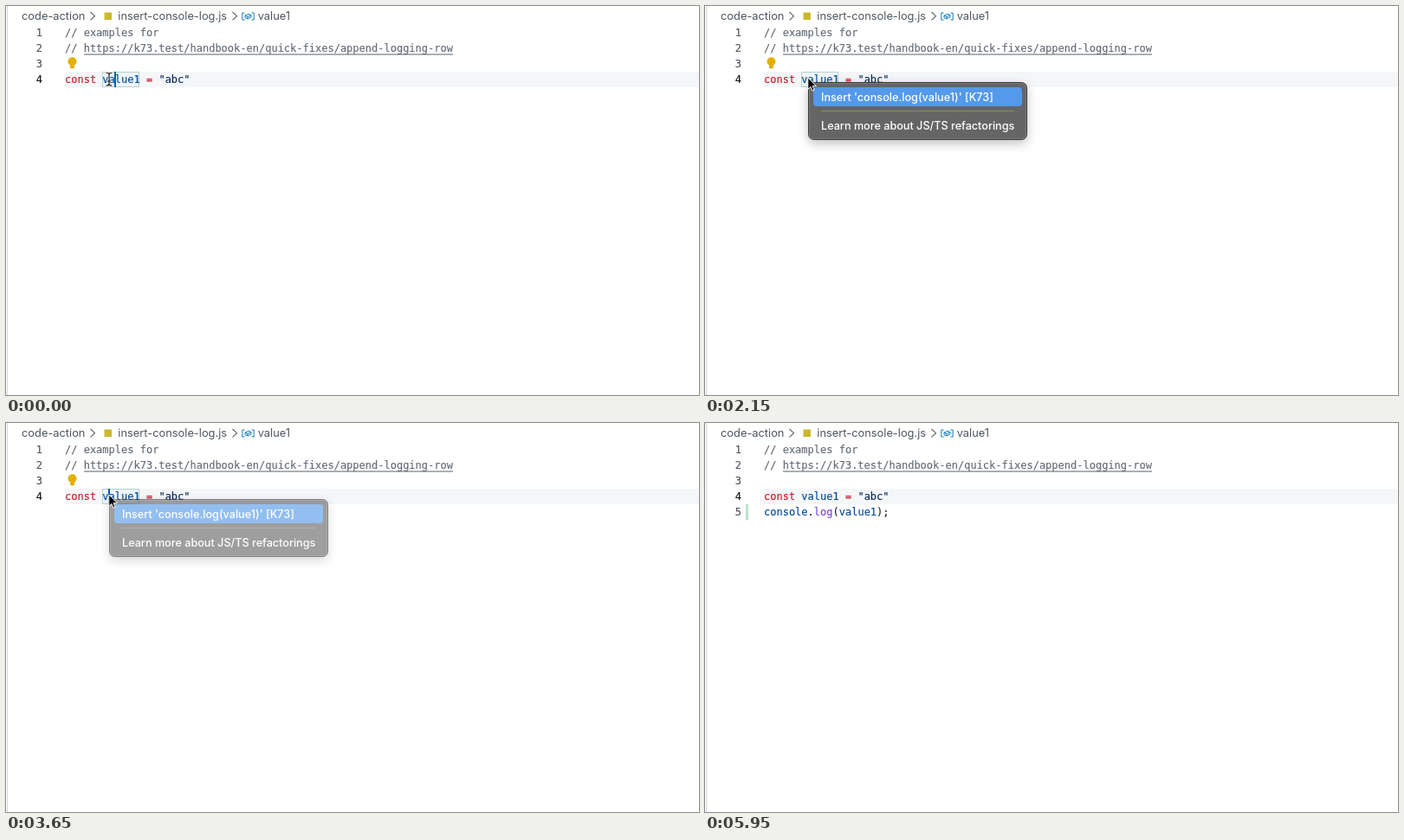
An HTML page for the animation above (6150 ms loop, 800x450 px).

```html
<!DOCTYPE html>
<html lang="en">
<head>
<meta charset="utf-8">
<title>Insert log statement</title>
<style>
  html, body { margin: 0; width: 100%; height: 100%; overflow: hidden; background: #fff; }
  svg { display: block; width: 100vw; height: 100vh; }
  text { white-space: pre; }
  .ui { font: 12.85px Inter, "Open Sans", sans-serif; fill: #4d555e; }
  .menu { font: 500 12.65px Inter, "Open Sans", sans-serif; fill: #fff; }
  .code { font: 12px "DejaVu Sans Mono", monospace; color: #24292f; }
  .code text, .code tspan { fill: currentColor; stroke: currentColor; stroke-width: .15; }
  .num { text-anchor: end; color: #4d555e; }
  .now { color: #111418; }
  .comment { color: #636b74; }
  .key { color: #cb1a2e; }
  .name { color: #044a9c; }
  .str { color: #0a2a5c; }
  .fn { color: #7a45d0; }
  .plain tspan { color: #24292f; }
  .line { fill: none; stroke: #59616a; }
</style>
</head>
<body>
<svg viewBox="0 0 800 450">
  <defs>
    <filter id="shadow" x="-20%" y="-40%" width="140%" height="200%">
      <feDropShadow dx="0" dy="4" stdDeviation="6" flood-color="#000" flood-opacity=".25"/>
    </filter>
  </defs>
  <rect width="800" height="450" fill="#fff"/>
  <rect x="1" width="1" height="450" fill="#d5d8dc"/>

  <g class="ui">
    <text x="18" y="16">code-action</text>
    <path class="line" stroke-width="1.1" d="M97.5 7l5 4.700-5 4.700M261.500 7l5 4.700-5 4.700"/>
    <rect x="113.500" y="7.500" width="8.500" height="8.500" fill="#cbb82f"/>
    <text x="129.300" y="16">insert-console-log.js</text>
    <g fill="none" stroke="#0f7bbd">
      <path d="M275.500 8h-2.700v8h2.700M283.500 8h2.700v8h-2.700"/>
      <path d="M276 11.200l4-2 3 1.300v2.400l-4 2-3-1.300zl3 1.300 4-2M279 12.500v2.400"/>
    </g>
    <text x="290.700" y="16">value1</text>
  </g>

  <rect x="68" y="76" width="732" height="18" fill="#f4f6f8"/>
  <rect id="mark" x="111.500" y="76.500" width="42" height="17" fill="#f0f5f7" stroke="#b0d3cd"/>

  <g class="code">
    <g id="nums"></g>
    <text class="comment" x="68" y="35">// examples for</text>
    <text class="comment" x="68" y="53">// https://k73.test/handbook-en/quick-fixes/append-logging-row</text>
    <path class="line" d="M90 56H516"/>
    <text x="68" y="89"><tspan class="key">const</tspan> <tspan class="name">value1</tspan> <tspan class="key">=</tspan> <tspan class="str">"abc"</tspan></text>
    <g id="added">
      <text class="num" x="42" y="107">5</text>
      <text id="call" x="68" y="107"><tspan class="name">console</tspan>.<tspan class="fn">log</tspan>(<tspan class="name">value1</tspan>);</text>
    </g>
  </g>
  <rect id="bar" x="47" y="94" width="3" height="18" fill="#b6e6c8"/>

  <g id="bulb" fill="#e3b000">
    <circle cx="76.500" cy="64.300" r="5"/>
    <path d="M74 67h5v4q0 1.200-1.200 1.200h-2.600q-1.200 0-1.200-1.200z"/>
  </g>
  <rect id="caret" y="76" width="2" height="18" fill="#0b5cb0"/>

  <g id="menu" class="menu">
    <rect x="119.500" y="88.500" width="252" height="66" rx="6" fill="#656566" stroke="#38383a" filter="url(#shadow)"/>
    <rect x="120.500" y="89.500" width="250" height="64" rx="5" fill="none" stroke="#7d7d7e"/>
    <rect x="125" y="94" width="241" height="22" rx="4" fill="#5499ea"/>
    <text x="134" y="109.500">Insert 'console.log(value1)' [K73]</text>
    <path stroke="#858586" d="M134 121.500H357"/>
    <text x="134" y="142.500">Learn more about JS/TS refactorings</text>
  </g>

  <path id="arrow" fill="#000" stroke="#fff" d="M118.800 82.800v13.600l3.100-2.900 2 4.700 2.200-.9-2-4.600h4.300z"/>
  <g id="beam" fill="none" stroke-linecap="round"></g>
</svg>
<script>
  const LOOP = 6150;
  const MENU_OPEN = 1000, FADE_START = 3587, FADE_END = 3758;
  const INSERT = 3950, COLOUR = 4000, BAR = 4100, BEAM_OUT = 4950;
  const BLINKS = [50, 500, 950, 1350, 1850, 2350, 2950, 3350, 3850, 4300, 4750, 5250, 5650];

  const $ = id => document.getElementById(id);
  const show = (id, on) => $(id).setAttribute('visibility', on ? 'visible' : 'hidden');
  const within = (t, a, b) => t >= a && t < b;

  // Text pointer: a dark stroke over a white halo.
  const BEAM = 'M116 77.500q3 0 3 1.700q0-1.700 3-1.700M119 79v11.500M117.500 87h3M116 92q3 0 3-1.700q0 1.700 3 1.700';
  $('beam').innerHTML = [['#fff', 2.6], ['#111', 1.2]].map(([colour, width]) =>
    `<path d="${BEAM}" stroke="${colour}" stroke-width="${width}"/>`).join('');

  $('nums').innerHTML = [1, 2, 3, 4].map(n =>
    `<text class="num${n === 4 ? ' now' : ''}" x="42" y="${17 + 18 * n}">${n}</text>`).join('');

  function draw(t) {
    const inserted = t >= INSERT;
    const pointing = within(t, MENU_OPEN, INSERT);
    const fade = Math.min(1, Math.max(0, (FADE_END - t) / (FADE_END - FADE_START)));

    show('mark', !inserted);
    show('bulb', !inserted);
    show('added', inserted);
    show('bar', t >= BAR);
    $('call').setAttribute('class', t < COLOUR ? 'plain' : '');

    show('menu', within(t, MENU_OPEN, FADE_END));
    $('menu').setAttribute('opacity', fade);

    show('arrow', pointing);
    show('beam', !pointing && t < BEAM_OUT);

    // The caret starts lit and toggles at every blink.
    show('caret', BLINKS.filter(b => b <= t).length % 2 === 0);
    $('caret').setAttribute('x', t < BLINKS[0] ? 125 : 118);
  }

  const start = performance.now();
  function tick() {
    draw((performance.now() - start) % LOOP);
    requestAnimationFrame(tick);
  }
  tick();
</script>
</body>
</html>
```
